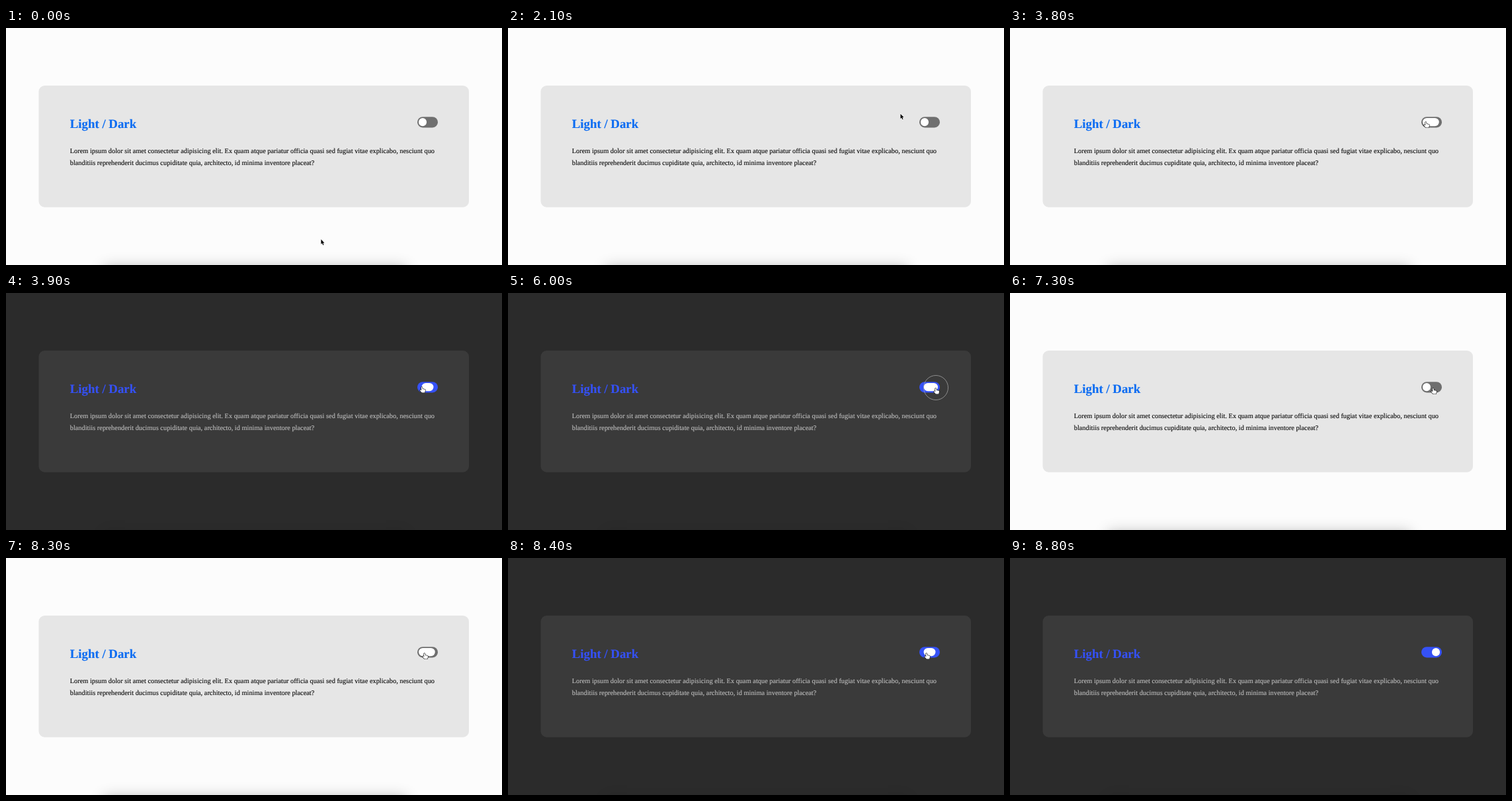
These frames come from a looping animation (750 px wide and 358 px high, 9.9 s). An HTML page with a canvas:

```html
<!DOCTYPE html>
<html lang="en">
<head>
<meta charset="utf-8">
<title>Light / Dark</title>
<style>
html, body { margin: 0; width: 100%; height: 100%; overflow: hidden; background: #fcfcfc; }
canvas { display: block; }
</style>
</head>
<body>
<canvas id="stage" width="750" height="358"></canvas>
<script>
const ctx = document.getElementById('stage').getContext('2d');
const LOOP = 9900, STEP = 100;
const SERIF = '"Liberation Serif", Times, serif';

const LIGHT = { bg: '#fcfcfc', card: '#e6e6e6', title: '#0c6cf2', text: '#111', track: '#6f6f6f', shade: 'rgba(0,0,0,.3)', ring: 'rgba(130,130,130,.35)' };
const DARK = { bg: '#2b2b2b', card: '#3a3a3a', title: '#3551f6', text: '#bababa', track: '#3551f6', shade: 'rgba(0,0,0,.12)', ring: 'rgba(175,175,175,.7)' };

// Each press lasts HOLD; the theme flips on release
const PRESSES = [3585, 5875, 8085];
const HOLD = 220, GLIDE = 280, RING = 200;

const START = { x: 476, y: 319 };
const MOVES = [
  { from: 0, to: 300, x: 598, y: 179 },
  { from: 1000, to: 1300, x: 591, y: 112 },
  { from: 2000, to: 2300, x: 599, y: 179 },
  { from: 2300, to: 2800, x: 629, y: 141 },
  { from: 4600, to: 4800, x: 637, y: 132 },
  { from: 4800, to: 5000, x: 647, y: 143 },
  { from: 6800, to: 7800, x: 633, y: 143 },
  { from: 8400, to: 8800, x: 600, y: 380 }
];

const clamp = u => Math.min(1, Math.max(0, u));
const mix = (a, b, u) => a + (b - a) * u;
const smooth = u => u * u * (3 - 2 * u);
const easeOut = u => 1 - (1 - u) ** 2;
const glide = ms => easeOut(clamp(ms / GLIDE));

function pointerAt(t) {
  return MOVES.reduce((p, m) => {
    const u = smooth(clamp((t - m.from) / (m.to - m.from)));
    return { x: mix(p.x, m.x, u), y: mix(p.y, m.y, u) };
  }, START);
}

function switchAt(t) {
  let dark = false, side = 0, stretch = 0, ring = false;
  for (const down of PRESSES) {
    if (t < down) break;
    const up = down + HOLD;
    stretch = glide(t - down) * (1 - glide(t - up));
    ring = t - down < RING;
    if (t >= up) {
      side = mix(side, dark ? 0 : 1, glide(t - up));
      dark = !dark;
    }
  }
  const width = 12 + 13.5 * stretch;
  return { dark, ring, width, left: mix(624, 650 - width, side) };
}

function box(x, y, w, h, r, color) {
  ctx.fillStyle = color;
  ctx.beginPath();
  ctx.roundRect(x, y, w, h, r);
  ctx.fill();
}

function write(str, y, font, color) {
  ctx.font = font + ' ' + SERIF;
  ctx.fillStyle = ctx.strokeStyle = color;
  ctx.lineWidth = 0.15;
  ctx.fillText(str, 96.7, y);
  ctx.strokeText(str, 96.7, y);
}

function shape(path, x, y, fill, line, width) {
  ctx.save();
  ctx.translate(x, y);
  ctx.lineWidth = width;
  ctx.lineJoin = 'round';
  ctx.strokeStyle = line;
  ctx.fillStyle = fill;
  ctx.stroke(path);
  ctx.fill(path);
  ctx.restore();
}

const ARROW = new Path2D('M.4 .3V7.6L2.1 6.1L3.3 9L4.5 8.5L3.3 5.7H5.5Z');
const HAND = new Path2D('M2.9 1.5Q3.7 .2 4.5 1.5L4.8 4L8 4.6Q9.2 5 9 6.2L8.2 9.4H3.8L1 6.3Q.9 5 2.1 5.2L3.3 6.2Z');
const BEAM = new Path2D('M-2 .5Q0 .5 0 2V8Q0 9.5 -2 9.5M2 .5Q0 .5 0 2M0 8Q0 9.5 2 9.5');

function drawPointer({ x, y }) {
  const within = (l, t, r, b) => x > l && x < r && y > t && y < b;
  if (within(622, 134, 653, 151)) {
    shape(HAND, x - 4, y, '#fff', '#111', 1.3);
  } else if (within(97, 176, 653, 213)) {
    shape(BEAM, x, y, 'transparent', '#222', 1);
  } else {
    shape(ARROW, x, y, '#000', '#fff', 1.2);
  }
}

function drawRing({ x, y }, color) {
  ctx.lineWidth = 1;
  ctx.strokeStyle = color;
  ctx.beginPath();
  ctx.arc(x, y, 18.5, 0, Math.PI * 2);
  ctx.stroke();
}

// Only the blurred edge reaches into view
function drawShade(color) {
  ctx.save();
  ctx.shadowColor = color;
  ctx.shadowBlur = 20;
  ctx.shadowOffsetY = -400;
  ctx.fillStyle = '#000';
  ctx.fillRect(148, 762, 457, 100);
  ctx.restore();
}

function draw(t) {
  const knob = switchAt(t), pointer = pointerAt(t);
  const theme = knob.dark ? DARK : LIGHT;

  ctx.fillStyle = theme.bg;
  ctx.fillRect(0, 0, 750, 358);
  drawShade(theme.shade);
  box(49.5, 87, 650.5, 183.7, 9, theme.card);

  write('Light / Dark', 151.4, 'bold 18.85px', theme.title);
  write('Lorem ipsum dolor sit amet consectetur adipisicing elit. Ex quam atque pariatur officia quasi sed fugiat vitae explicabo, nesciunt quo', 189.2, '10.36px', theme.text);
  write('blanditiis reprehenderit ducimus cupiditate quia, architecto, id minima inventore placeat?', 207.4, '10.36px', theme.text);

  box(622, 134.2, 31, 16.2, 8.1, theme.track);
  box(knob.left, 135.9, knob.width, 12.4, 6.2, '#fff');

  if (knob.ring) drawRing(pointer, theme.ring);
  drawPointer(pointer);
}

ctx.textRendering = 'geometricPrecision';

function tick() {
  const t = performance.now() % LOOP;
  draw(Math.floor(t / STEP) * STEP);
  requestAnimationFrame(tick);
}
tick();
</script>
</body>
</html>
```
